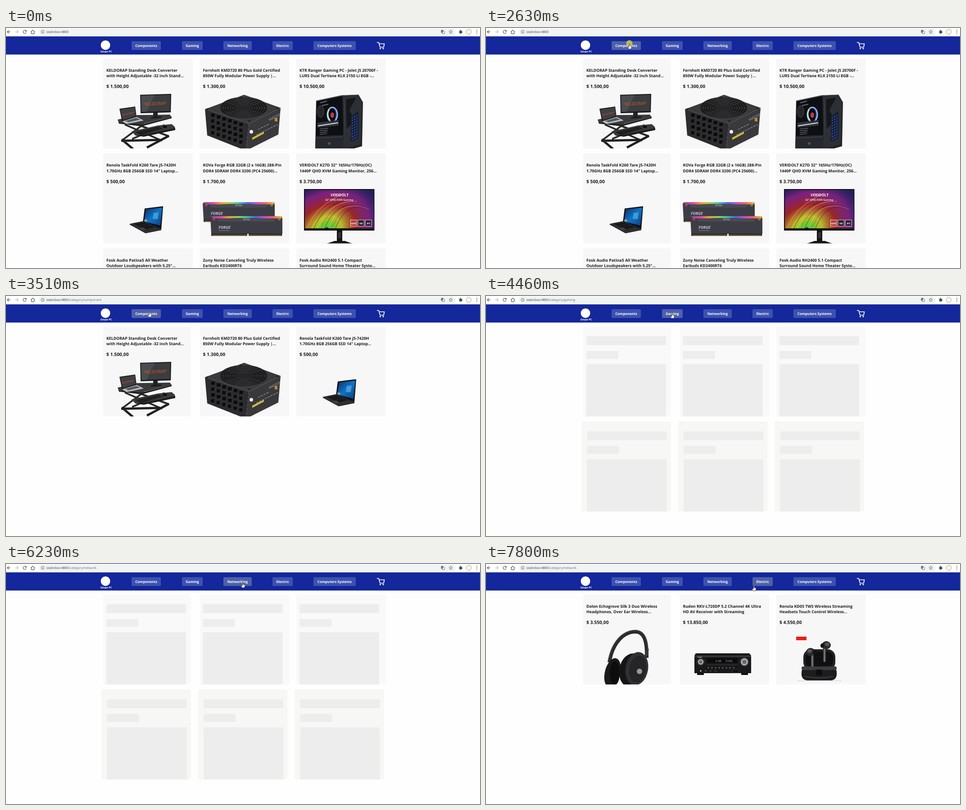
An HTML page for the animation above (8 s loop, 1053 by 532 pixels).

```html
<!DOCTYPE html>
<html lang="en">
<head>
<meta charset="utf-8">
<title>Shop</title>
<style>
html, body { margin: 0; width: 100%; height: 100%; overflow: hidden; background: #fefefe; }
svg { display: block; width: 1053px; height: 532px; cursor: default; }
text { font-family: "Open Sans", sans-serif; text-rendering: geometricPrecision; white-space: pre; }
.title { font-size: 8.8px; font-weight: 700; fill: #1b1b1b; }
.price { font-size: 10.27px; font-weight: 700; fill: #1b1b1b; }
.nav { font-size: 7.68px; font-weight: 700; fill: #fff; text-anchor: middle; }
.url { font-size: 7.25px; fill: #33373b; }
</style>
</head>
<body>
<svg id="stage" viewBox="0 0 1053 532"></svg>
<script>
const LOOP = 8000, COL = 214.5, ROW = 210.6;
const stage = document.getElementById('stage');
const range = n => [...Array(n).keys()];
const each = (n, f) => range(n).map(f).join('');

// SVG helpers
const rect = (x, y, w, h, fill, more = '') => `<rect x="${x}" y="${y}" width="${w}" height="${h}" fill="${fill}" ${more}/>`;
const poly = (pts, fill, more = '') => `<polygon points="${pts}" fill="${fill}" ${more}/>`;
const oval = (x, y, rx, ry, fill, more = '') => `<ellipse cx="${x}" cy="${y}" rx="${rx}" ry="${ry}" fill="${fill}" ${more}/>`;
const line = (d, color, w = 1, more = '') => `<path d="${d}" fill="none" stroke="${color}" stroke-width="${w}" ${more}/>`;
const label = (x, y, size, fill, str, more = '') => `<text x="${x}" y="${y}" font-size="${size}" fill="${fill}" ${more}>${str}</text>`;
const mid = 'text-anchor="middle"';
const grad = (id, dir, colors) => `<linearGradient id="${id}" ${dir}>` +
  colors.map((c, i) => `<stop offset="${i / (colors.length - 1)}" stop-color="${c}"/>`).join('') + '</linearGradient>';

// Product pictures, each drawn in its usual cell
function deskArt() {
  return line('M264 214L347 250M306 213L258 249M352 215L280 246M300 217L362 240', '#29292b', 4) +
    line('M257 247L282 268M256 250L345 248M313 265L362 239', '#202022', 5) +
    poly('248,203 292,193 364,192 368,197 302,213 300,217 250,209', '#3a3a3c') +
    poly('250,209 300,214 368,197 368,200 301,218 251,212', '#1f1f21') +
    poly('322,198 344,196 346,199 322,201', '#19191b') + rect(327, 187, 10, 11, '#222') +
    poly('298,148 367,146 366,187 299,189', '#18191b') + poly('300,150 365,148 364,184 301,186', '#3b3d40') +
    poly('300,150 330,149 312,186 301,186', '#4a4c4f') +
    label(332, 171, 9.6, '#e2571c', 'KELDORAP', mid + ' textLength="52" transform="rotate(-2 332 168)"').replace(' textLength="52"', '') +
    poly('252,179 287,174 290,197 258,207', '#1c1d1f') + poly('254,181 286,176 288,195 260,204', '#3e4043') +
    poly('258,207 290,197 306,205 268,213', '#b9bbbe') + poly('265,206 289,199 298,203 272,209', '#55575a') +
    label(271, 192, 5.3, '#e2571c', 'KELDORAP', mid + ' transform="rotate(-12 271 190)"') +
    poly('279,229 338,216 368,213 375,219 376,226 306,240 287,238', '#39393b') +
    poly('287,238 306,237 376,222 376,226 306,241', '#1b1b1d') +
    poly('289,231 338,219 348,223 300,237', '#111') +
    each(3, i => line(`M${292 + i * 3.5} ${232 + i * 1.5}L${339 + i * 3} ${220.5 + i * 1.4}`, '#4b4b4e', .6)) +
    oval(353, 219, 5, 3, '#111');
}

function supplyArt() {
  return poly('442,180 529,148 610,177 540,212', '#3b3b3d') +
    poly('442,180 540,212 533,272 447,238', '#2c2c2e') +
    poly('540,212 610,177 605,236 533,272', '#39393b') +
    line('M442 180L540 212L610 177', '#57575a', .8) + oval(528, 177, 53, 24, '#161617') +
    each(9, i => oval(528, 177, 8 + i * 5.5, 3.6 + i * 2.5, 'none', 'stroke="#515154" stroke-width=".9"')) +
    each(10, i => {
      const a = i * Math.PI / 5;
      return line(`M528 177l${52 * Math.cos(a)} ${23.5 * Math.sin(a)}`, '#39393b', 1);
    }) + oval(528, 177, 9, 4, '#262628') +
    [[447, 180], [522, 154], [603, 178], [541, 206]].map(p => oval(p[0], p[1], 2.5, 1.5, '#151516')).join('') +
    each(4, r => each(6, i => rect(455 + i * 12.5, 189 + r * 13 + i * 4.1, r % 2 ? 8 : 9.5, 8.5, '#0b0b0c', 'rx="1" stroke="#4a4a4c" stroke-width=".5"'))) +
    label(597, 200, 7, '#b5b5b8', 'KMD720', mid + ' transform="rotate(-27 597 198)"') +
    rect(597, 199, 6, 8, '#b28b3a') + oval(545, 230, 4, 4, '#eee') +
    poly('547,243 573,230 573,234 547,248', '#d7bd3d') +
    line('M556 237L604 214M560 225L584 213', '#98989b', 1.3, 'stroke-dasharray="5 2"');
}

function towerArt() {
  return poly('689,161 746,149 783,148 793,165 791,262 770,268 687,268', '#202226') +
    poly('690,163 747,151 750,268 688,268', '#0e0f12') +
    poly('748,151 781,149 791,166 788,258 752,268', '#2c2f34') +
    poly('755,158 778,154 763,182 774,205 757,224', '#15171b') +
    poly('767,196 783,184 783,246 765,252', '#171d31') +
    each(9, r => each(3, c => rect(768 + c * 5, 197 + r * 6 - c * 2, 2.6, 3, '#2b4a9f'))) +
    line('M690 162L747 150L783 148L793 165', '#555960', 1) + line('M753 158L750 267M755 224L782 252', '#454950', 1) +
    oval(699, 185, 7, 13, '#22262b', 'stroke="#50565d"') +
    oval(725, 192, 11, 16, '#0a0a10', 'stroke="#8fc6ee" stroke-width="3"') +
    line('M718 181a10 15 0 0 0 2 23', '#e3e9f4', 2) + line('M728 178a10 15 0 0 1 3 24', '#4a5de0', 2) +
    oval(725, 193, 4, 6, '#b94637') +
    line('M698 166L713 162M702 172L716 169', '#687078', 2) +
    poly('692,210 738,204 739,216 692,221', '#30343a') + line('M693 217L738 210', '#dfe4ea', 2) +
    each(4, i => line(`M697 ${224 + i * 4}L${716 - i} ${222 + i * 4}`, '#878c93', 1)) +
    poly('688,240 749,237 750,268 687,268', '#26292d') + line('M690 244L748 241', '#555a60', .8) +
    oval(718, 256, 3, 3, '#50555b');
}

function laptopArt() {
  return poly('308,400 349,395 345,446 304,431', '#111214') +
    poly('311,402 347,398 343,438 307,429', 'url(#blue)') +
    poly('328,410 339,409 337,424 326,423', '#67c4ef', 'opacity=".55"') +
    poly('308,424 314,425 313,430 307,428', '#8ca0a8') +
    poly('275,434 305,428 345,446 310,453', '#2b2c2e') + poly('275,434 310,453 345,446 345,448 310,455 275,436', '#111') +
    poly('285,434 305,430 330,441 310,446', '#151618') + each(3, i => line(`M${289 + i * 7} ${434 + i * 3.5}l19 -3.5`, '#444', .6)) +
    poly('294,444 305,442 312,447 303,449', '#3d3e40');
}

function stick(x, y) {
  return poly(`${x},${y + 3} ${x + 4},${y} ${x + 158},${y} ${x + 160},${y + 5} ${x + 160},${y + 40} ${x + 2},${y + 40}`, '#3d3d46') +
    rect(x + 4, y, 154, 5, 'url(#rainbow)') +
    poly(`${x + 14},${y + 6} ${x + 58},${y + 4} ${x + 100},${y + 4} ${x + 148},${y + 6} ${x + 140},${y + 12} ${x + 20},${y + 12}`, '#4a4a54') +
    rect(x + 2, y + 39, 157, 5, '#262528') + line(`M${x + 4} ${y + 42.5}h154`, '#c99b43', 2, 'stroke-dasharray="1.4 .8"') +
    rect(x + 82, y + 39, 3, 5, '#f2f2f2') +
    oval(x + 8, y + 7, 2.8, 2.8, '#b33f2f') + oval(x + 153, y + 7, 2.8, 2.8, '#a86a3a') +
    label(x + 80, y + 9, 6, '#d0d0d6', 'KOVa', mid) +
    label(x + 18, y + 28, 8.6, '#c5c5ca', 'FORGE', 'font-weight="700" font-style="italic"') +
    line(`M${x + 18} ${y + 32}h24`, '#8e8e96', 1);
}
const memoryArt = () => stick(437, 386) + stick(454, 417);

function monitorArt() {
  return rect(662, 357, 156.5, 92, '#101114') +
    `<g clip-path="url(#screen)">${rect(664, 359, 153, 85, 'url(#night)')}` +
    each(30, i => oval(712, 446, 8 + i * 4.6, 6 + i * 3.6, 'none',
      `stroke="hsl(${(470 - i * 8.5) % 360} ${72 - i * .7}% ${54 - i * 1.1}%)" stroke-width="4.8" transform="rotate(-28 712 446)" opacity=".9"`)) +
    each(9, i => line(`M${668 + i * 8} 444Q${690 + i * 9} ${392 - i * 3} ${752 + i * 9} ${366 + i * 6}`, ['#ffcf59', '#d42c76', '#2c1b57'][i % 3], 1.2, 'opacity=".55"')) +
    '</g>' +
    label(741, 373, 8.2, '#fff', 'VERIDOLT', mid + ' font-weight="700"') +
    label(740, 383, 5.9, '#fff', '32" QHD KVM Gaming', mid + ' font-weight="600"') +
    ['QHD', '165', 'IPS'].map((s, i) => rect(765.5 + i * 16.5, 425.5, 13.5, 14, i ? '#2a2230' : '#b33d38', 'stroke="#fff" stroke-width=".8"') +
      label(772.2 + i * 16.5, 434.5, 5, '#fff', s, mid + ' font-weight="700"')).join('') +
    rect(735, 449, 12, 24, '#131315') + rect(738, 453, 6, 13, '#333') +
    poly('712,478 730,472 753,472 770,478', '#17171a');
}

function headsetArt() {
  return line('M274 218C281 176 304 151 331 150C352 150 358 172 357 208', '#2b2b2d', 8) +
    line('M272 214C280 174 304 148 331 148C354 148 361 172 360 205', '#4c4c4f', 1) +
    oval(281, 241, 17, 33, '#1a1a1b', 'transform="rotate(14 281 241)"') + oval(286, 242, 11, 26, '#0d0d0e') +
    oval(324, 236, 28, 38, '#151516', 'transform="rotate(10 324 236)"') +
    oval(335, 232, 25, 37, '#303032', 'transform="rotate(10 335 232)"') +
    oval(337, 233, 20, 31, '#252527', 'transform="rotate(10 337 233)" stroke="#414144" stroke-width=".8"') +
    line('M359 188L355 204', '#39393c', 6) + oval(341, 238, 6, 6, '#98989b');
}

function knob(x, r) {
  return oval(x, 217, r + 1.5, r + 1.5, '#0a0a0b', 'stroke="#555"') + oval(x, 217, r, r, '#aeb1b4') + oval(x, 217, r * .6, r * .6, '#66696c');
}
function receiverArt() {
  return rect(469, 241, 15, 5, '#111') + rect(567, 241, 15, 5, '#111') +
    poly('466,198 585,198 589,203 589,242 463,242 463,203', '#19191a') + rect(463, 203, 126, 3, '#39393b') +
    rect(491, 209, 68, 10, '#090a0c') + rect(491, 223, 68, 1, '#3d3d40') +
    label(510, 217, 6, '#b3bdc5', '0 dB', '') + label(532, 217, 6, '#b3bdc5', 'TUNE') +
    knob(477, 6.2) + knob(574, 8) +
    each(8, i => oval(494 + i * 8, 230, 1.2, 1.2, '#8c8f92')) + each(4, i => oval(477 + i * 11, 237, 1.8, 1.8, i ? '#444' : '#c9c9c9')) +
    rect(548, 235, 14, 5, '#090909', 'stroke="#444" stroke-width=".6"') + rect(470, 206, 10, 1.3, '#aaa');
}

function bud(x, y, side) {
  return rect(x - 3.5, y + 2, 7, 35, 'url(#stem)', 'rx="3"') + oval(x + side * 4, y, 10, 9, '#2c2c2e') +
    oval(x + side * 6, y - 2, 5, 4, '#58585b') + oval(x - side * 5, y + 1, 4, 5, '#141415');
}
function earbudArt() {
  return rect(689, 161, 23, 8, '#e2231a') +
    rect(705, 189, 71, 46, '#222224', 'rx="17"') + rect(710, 194, 61, 35, '#101011', 'rx="13"') +
    bud(725, 195, -1) + bud(752, 180, 1) +
    rect(701, 227, 78, 31, '#1d1d1f', 'rx="13"') + rect(701, 227, 78, 8, '#3c3c3f', 'rx="4"') +
    rect(733, 234, 14, 13, '#0d0d0e', 'rx="3"') + line('M708 249Q740 256 771 249', '#5d5d61', 1) +
    line('M692 259H790', '#cfcfcf', 1);
}

// Goods: usual column and row, two title lines, price, picture
const goods = {
  desk: [0, 0, 'KELDORAP Standing Desk Converter', 'with Height Adjustable -32 inch Stand…', '1.500,00', deskArt],
  supply: [1, 0, 'Fernholt KMD720 80 Plus Gold Certified', '850W Fully Modular Power Supply |…', '1.300,00', supplyArt],
  tower: [2, 0, 'KTR Ranger Gaming PC - Jolet j5 20700F -', 'LURS Dual TerVane KLX 2150 Li 8GB -…', '10.500,00', towerArt],
  laptop: [0, 1, 'Renola TaskFold K260 Tare j5-7420H', '1.70GHz 8GB 256GB SSD 14" Laptop…', '500,00', laptopArt],
  memory: [1, 1, 'KOVa Forge RGB 32GB (2 x 16GB) 288-Pin', 'DDR4 SDRAM DDR4 3200 (PC4 25600)…', '1.700,00', memoryArt],
  monitor: [2, 1, 'VERIDOLT K27D 32" 165Hz/170Hz(OC)', '1440P QHD KVM Gaming Monitor, 256…', '3.750,00', monitorArt],
  outdoor: [0, 2, 'Fosk Audio Patina5 All Weather', 'Outdoor Loudspeakers with 5.25"…', '2.100,00'],
  earpiece: [1, 2, 'Zuny Noise Canceling Truly Wireless', 'Earbuds KD2400RT6', '1.900,00'],
  theater: [2, 2, 'Fosk Audio RH2400 5.1 Compact', 'Surround Sound Home Theater Syste…', '6.200,00'],
  headset: [0, 0, 'Dolen Echogrove Silk 3 Duo Wireless', 'Headphones, Over Ear Wireless…', '3.550,00', headsetArt],
  receiver: [1, 0, 'Ruden RKV-L720DP 5.2 Channel 4K Ultra', 'HD AV Receiver with Streaming', '13.850,00', receiverArt],
  earbuds: [2, 0, 'Renola KD05 TWS Wireless Streaming', 'Headsets Touch Control Wireless…', '4.550,00', earbudArt]
};
const pages = {
  home: 'desk supply tower laptop memory monitor outdoor earpiece theater',
  component: 'desk supply laptop',
  gaming: 'tower memory monitor',
  network: 'headset receiver earbuds'
};

function cell(name, i) {
  const [col, row, top, bottom, price, art] = goods[name];
  return `<g transform="translate(${i % 3 * COL} ${Math.floor(i / 3) * ROW})">
    <text class="title" x="223" y="96.7">${top}</text><text class="title" x="223" y="109">${bottom}</text>
    <text class="price" x="223" y="133.4">$ ${price}</text>
    <g clip-path="url(#cell)"><g transform="translate(${-col * COL} ${-row * ROW})">${art ? art() : ''}</g></g></g>`;
}
const page = (id, body) => `<g id="${id}" display="none">${body}</g>`;
const skeleton = each(6, i => {
  const row = Math.floor(i / 3), x = 223 + i % 3 * COL + row * 1.5, y = row * ROW;
  return rect(x, 89.3 + y, 177, 19.7, '#ededed', 'rx="1"') + rect(x, 122 + y, 71, 17.5, '#ededed', 'rx="1"') + rect(x, 151.4 + y, 177, 115.6, '#ededed');
});

const tabs = [['Components', 279, 344], ['Gaming', 391, 437], ['Networking', 483, 546], ['Electric', 592, 637], ['Computers Systems', 683, 777]];

const chrome = rect(0, 0, 1053, 18.5, '#fff') + rect(73, 1, 926, 15, '#f1f3f4', 'rx="7.5"') +
  line('M10 8.5H3M6.3 5L2.8 8.5L6.3 12', '#4d5156', 1.1) + line('M20 8.5H27M23.7 5L27.2 8.5L23.7 12', '#b9bcbf', 1.1) +
  line('M44.5 6.6A3.6 3.6 0 1 0 45 9.4M45.2 4.4V7.2H42.3', '#4d5156', 1.1) +
  line('M55 8.8L59.5 4.6L64 8.8M56.4 8V12.6H62.6V8', '#4d5156', 1.1) +
  oval(81.5, 8.5, 3.4, 3.4, 'none', 'stroke="#5f6368" stroke-width=".9"') + line('M81.5 8V10.3M81.5 6.4V7.2', '#5f6368', .9) +
  rect(966.5, 4.5, 5, 6, '#5f6368') + rect(969.5, 7, 4.5, 5.5, '#f1f3f4', 'stroke="#5f6368" stroke-width=".8"') +
  line('M988 4.4L989.1 7.1L992 7.3L989.8 9.2L990.5 12L988 10.5L985.5 12L986.2 9.2L984 7.3L986.9 7.1Z', '#5f6368', .9) +
  rect(1007, 6, 5.6, 6.2, '#4d5156', 'rx=".8"') + oval(1009.6, 5.6, 1.4, 1.4, '#4d5156') + oval(1012.8, 9, 1.4, 1.4, '#4d5156') +
  oval(1028, 8.5, 5.6, 5.6, '#f6f7ef', 'stroke="#97a26a" stroke-width=".9"') +
  each(3, i => oval(1046, 5 + i * 3.4, .9, .9, '#4d5156')) +
  '<text class="url" x="90" y="11.2">staticbox:4800<tspan id="path" fill="#696e73"></tspan></text>';

const header = rect(0, 18.5, 1053, 40.3, '#14279b') + oval(221, 38, 10.5, 10.5, '#fff') +
  label(222.5, 54.2, 5.5, '#fff', 'Zaupo PC', mid + ' font-weight="700"') +
  tabs.map(([name, a, b]) => rect(a, 29.3, b - a, 19.4, '#3d52af', 'rx="2" class="tab"') +
    `<text class="nav" x="${(a + b) / 2}" y="42">${name}</text>`).join('') +
  line('M824.5 32H828L831 42.5H839L840.5 35H829', '#fff', 1.7, 'stroke-linejoin="round" stroke-linecap="round"') +
  oval(831.5, 45.5, 1.6, 1.6, '#fff') + oval(838, 45.5, 1.6, 1.6, '#fff');

const defs = `<defs>${grad('blue', 'x1="0" y1="0" x2="1" y2="1"', ['#0b2d63', '#1273c4', '#0a3c7d'])}
  ${grad('rainbow', '', ['#7d4cc0', '#d94a90', '#e8a33c', '#9ed24b', '#39c5b4', '#4a66e0', '#c44bd0', '#e7665a', '#e0b84a'])}
  ${grad('night', '', ['#141029', '#3a1553', '#1c2c4d', '#123a44'])}
  ${grad('stem', '', ['#1a1a1b', '#8a8a8e', '#1a1a1b'])}
  <clipPath id="cell">${rect(212, 67, 204, 200)}</clipPath>
  <clipPath id="screen">${rect(664, 359, 153, 85)}</clipPath>
  <filter id="shade" x="-10%" y="-10%" width="120%" height="120%"><feDropShadow dx="0" dy="1" stdDeviation="1.1" flood-opacity=".28"/></filter></defs>`;

stage.innerHTML = defs + rect(0, 0, 1053, 532, '#fefefe') +
  each(9, i => rect(0, 67.3 + Math.floor(i / 3) * ROW, 199, 199.5, '#f7f7f7', 'rx="3" class="card"')) +
  Object.entries(pages).map(([id, list]) => page(id, list.split(' ').map(cell).join(''))).join('') +
  page('skeleton', skeleton) + chrome + header +
  oval(0, 0, 7, 7, '#e0cf3a', 'id="click" opacity=".8"') +
  `<g id="pointer"><path id="hand" d="M-.9 1Q0 -.6 .9 1V5.2L4 5.9Q5 6.2 4.9 7.4L4.1 12.6H-1.4L-4 8.6Q-4 7 -2.4 7.8L-.9 9Z" fill="#fff" stroke="#222" stroke-width=".8"/>
   <path id="arrow" d="M0 0V10.2L2.4 8L4 11.6L5.5 11L4 7.5H7.2Z" fill="#fff" stroke="#222" stroke-width=".7"/></g>`;

const $ = id => document.getElementById(id);
const cards = [...stage.querySelectorAll('.card')], tabBoxes = [...stage.querySelectorAll('.tab')];

// Pointer moves: start, end, steps, way points
const moves = [
  [300, 1080, 12, [[1000, 518], [745, 420], [420, 330], [166, 245], [274, 182]]],
  [1130, 1270, 3, [[274, 182], [288.5, 158]]],
  [1600, 2220, 9, [[288.5, 158], [302, 90], [318.5, 34]]],
  [3770, 4250, 8, [[318.5, 34], [372, 42], [413.5, 37]]],
  [5680, 5950, 5, [[413.5, 37], [470, 44], [526, 40]]],
  [7380, 7800, 7, [[526, 40], [560, 45], [595, 47]]]
];
const clicks = [[2630, 2690], [4390, 4460], [6160, 6230]];
// Time, page, address path, rows of cards
const views = [
  [0, 'home', '', 3], [2690, 'skeleton', 'component', 2], [3510, 'component', 'component', 1],
  [4460, 'skeleton', 'gaming', 2], [5290, 'gaming', 'gaming', 1],
  [6230, 'skeleton', 'network', 2], [7050, 'network', 'network', 1]
];

function pointerAt(t) {
  const move = moves.filter(m => t >= m[0]).pop();
  if (!move) return null;
  const [start, end, steps, pts] = move;
  const k = Math.min(steps, Math.floor((t - start) / (end - start) * (steps - 1) + 1.001)) / steps;
  const u = k * k * (3 - 2 * k) * (pts.length - 1);
  const i = Math.min(pts.length - 2, Math.floor(u)), f = u - i;
  return [0, 1].map(a => pts[i][a] + (pts[i + 1][a] - pts[i][a]) * f);
}

function draw(t) {
  const [, id, path, rows] = views.filter(v => t >= v[0]).pop();
  const at = pointerAt(t), [px, py] = at || [-99, -99];
  let over = false;

  for (const name of [...Object.keys(pages), 'skeleton']) $(name).setAttribute('display', name === id ? 'inline' : 'none');
  $('path').textContent = path && '/category/' + path;

  cards.forEach((card, i) => {
    const col = i % 3, row = Math.floor(i / 3), x = 216 + col * COL, y = 67.3 + row * ROW;
    const shown = row < rows;
    const hit = shown && px > x && px < x + 199 && py > y && py < y + 199.5;
    const shifted = hit || (id === 'skeleton' && row === 1);
    const narrow = !hit && col === 0 && t >= 1080;
    over = over || hit;
    card.setAttribute('display', shown ? 'inline' : 'none');
    card.setAttribute('x', shifted ? x - 4 : x);
    card.setAttribute('width', hit ? 203 : narrow && !shifted ? 195 : 199);
    card.setAttribute('fill', id === 'skeleton' ? (row ? '#f7f7f5' : '#f9f9f9') : '#f7f7f7');
    if (hit) card.setAttribute('filter', 'url(#shade)'); else card.removeAttribute('filter');
  });

  tabs.forEach(([, a, b], i) => {
    const hit = px >= a && px <= b && py > 29 && py < 49;
    over = over || hit;
    tabBoxes[i].setAttribute('fill', hit ? '#4f60a9' : '#3d52af');
  });

  const place = `translate(${px} ${py})`;
  $('pointer').setAttribute('transform', place);
  $('hand').setAttribute('display', over ? 'inline' : 'none');
  $('arrow').setAttribute('display', over ? 'none' : 'inline');
  $('click').setAttribute('transform', place);
  $('click').setAttribute('display', clicks.some(([a, b]) => t >= a && t < b) ? 'inline' : 'none');
}

const origin = performance.now();
function tick() {
  draw((performance.now() - origin) % LOOP);
  requestAnimationFrame(tick);
}
draw(0);
requestAnimationFrame(tick);
</script>
</body>
</html>
```
